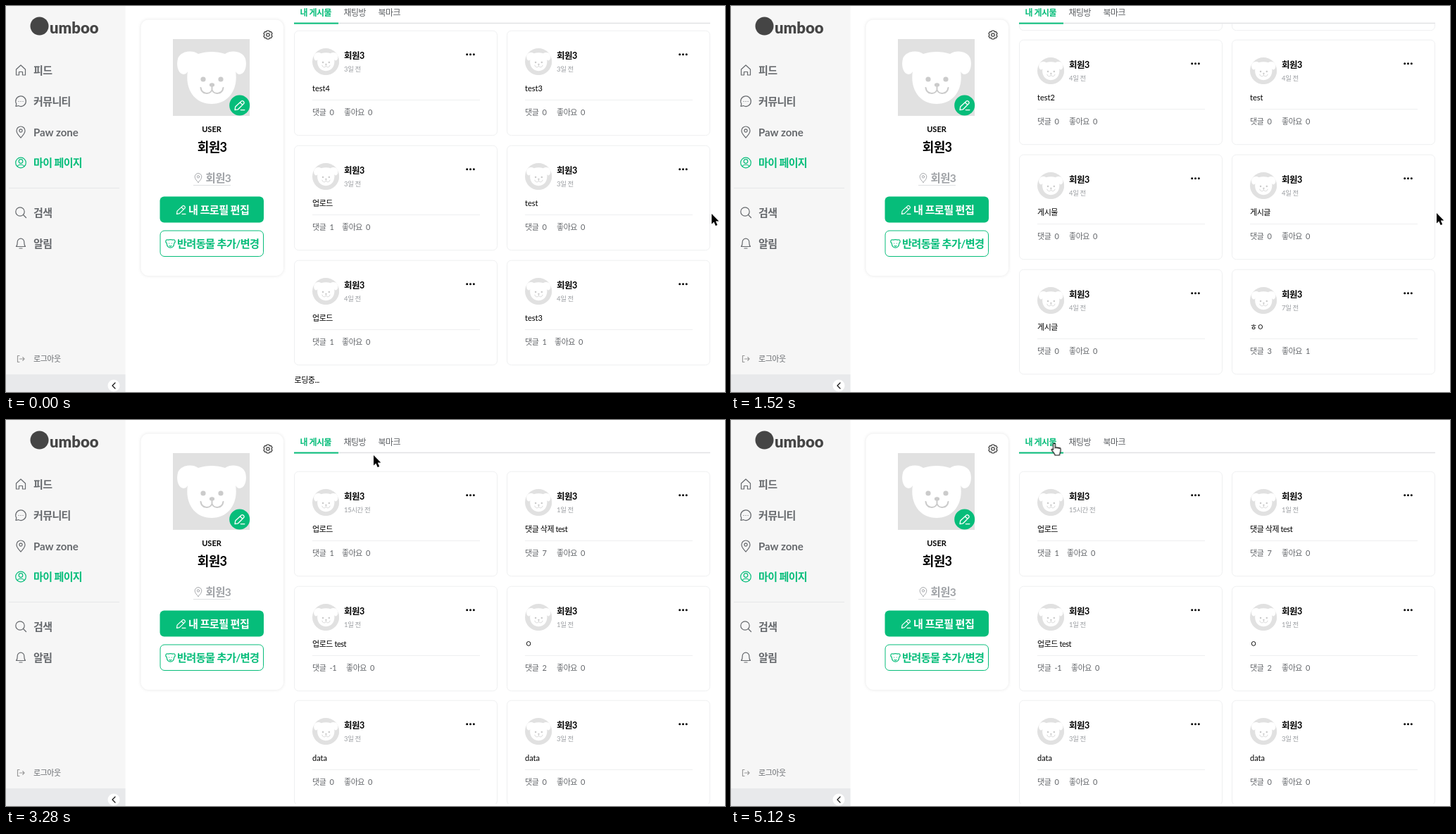
Write an HTML page that moves like this. It is 1021 px wide and 548 px high and loops after 5440 ms.

```html
<!DOCTYPE html>
<html lang="ko">
<head>
<meta charset="utf-8">
<title>마이 페이지</title>
<style>
html, body { margin: 0; width: 100%; height: 100%; overflow: hidden; background: #fff; }
svg { display: block; }
text {
  font-family: Lato, "Noto Sans CJK KR", "Noto Sans CJK", sans-serif;
  letter-spacing: -.04em; white-space: pre;
}
.b { font-weight: 700; }
.mid { text-anchor: middle; }
.latin { letter-spacing: 0; }
.menu text { font-size: 15px; font-weight: 700; }
.icon { fill: none; stroke: currentColor; stroke-width: 1.2; stroke-linecap: round; stroke-linejoin: round; }
.tabs text { font-size: 12px; fill: #5c5f63; }
.tabs .on { font-weight: 700; fill: #06bd7a; }
.card { fill: #fff; stroke: #eeeff0; }
.rule { fill: #eeeff0; }
.soft { fill: #fff; filter: drop-shadow(0 0 2px rgba(0, 0, 0, .11)); }
.bone { fill: #e9eaec; }

.scroll, .tabs, .late, .loading, .posts, .chat, .pointer, .arrow, .hand {
  animation: 5440ms step-end infinite;
}
.scroll { animation-name: scroll; }
.tabs { animation-name: stick; }
.late { animation-name: late; }
.loading { animation-name: loading; }
.posts { animation-name: posts; }
.chat { animation-name: chat; }
.pointer { animation-name: pointer; }
.arrow { animation-name: arrow; }
.hand { animation-name: hand; }

@keyframes scroll {
  0% { transform: translateY(-526px); }
  16.176% { transform: translateY(-526px); animation-timing-function: steps(3); }
  18.382% { transform: translateY(-733px); animation-timing-function: steps(2); }
  19.852% { transform: translateY(-840px); }
  22.794% { transform: translateY(-840px); animation-timing-function: steps(3); }
  25% { transform: translateY(-930px); animation-timing-function: steps(4); }
  27.941% { transform: translateY(-1001px); }
  36.764% { transform: translateY(-1001px); animation-timing-function: steps(3); }
  38.97% { transform: translateY(-790px); animation-timing-function: steps(4); }
  41.911% { transform: translateY(-412px); animation-timing-function: steps(3); }
  44.117% { transform: translateY(-150px); animation-timing-function: steps(3); }
  46.323%, 100% { transform: translateY(0); }
}
@keyframes stick {
  0% { transform: translateY(-22px); }
  46.323%, 100% { transform: translateY(0); }
}
@keyframes late { 0% { opacity: 0; } 10.294%, 100% { opacity: 1; } }
@keyframes loading { 0% { opacity: 1; } 10.294%, 100% { opacity: 0; } }
@keyframes posts { 0% { opacity: 1; } 65.441% { opacity: 0; } 92.647%, 100% { opacity: 1; } }
@keyframes chat { 0% { opacity: 0; } 65.441% { opacity: 1; } 92.647%, 100% { opacity: 0; } }
@keyframes pointer {
  0% { transform: translate(1002px, 295px); }
  27.941% { transform: translate(1002px, 294px); }
  48.529% { transform: translate(1002px, 294px); animation-timing-function: steps(8); }
  54.411% { transform: translate(650px, 118px); animation-timing-function: steps(6); }
  58.823% { transform: translate(522px, 50px); }
  60.294% { transform: translate(522px, 50px); animation-timing-function: steps(4); }
  63.235% { transform: translate(495px, 34px); }
  81.617% { transform: translate(495px, 34px); animation-timing-function: steps(14); }
  91.911%, 100% { transform: translate(459px, 33px); }
}
@keyframes arrow { 0% { opacity: 1; } 61.029%, 100% { opacity: 0; } }
@keyframes hand { 0% { opacity: 0; } 61.029%, 100% { opacity: 1; } }
</style>
</head>
<body>
<svg width="1021" height="548" viewBox="0 0 1021 548">
  <defs>
    <clipPath id="view"><rect x="400" width="621" height="544.5"/></clipPath>
    <clipPath id="round"><circle cx="54.5" cy="54.5" r="54.5"/></clipPath>
    <g id="dog">
      <rect width="109" height="109" fill="#e1e1e1"/>
      <path fill="#fff" d="M36 21C26 14 10 18 7 28C4 40 9 50 15 50C18 50 20 48 21 46C17 70 30 92 55 92C80 92 93 70 89 46C90 48 92 50 95 50C101 50 106 40 103 28C100 18 84 14 74 21C62 17 48 17 36 21Z"/>
      <g fill="#cbcbcb">
        <circle cx="43" cy="57" r="3.6"/>
        <circle cx="68" cy="57" r="3.6"/>
        <ellipse cx="55.5" cy="65" rx="3.6" ry="2.7"/>
        <path d="M55.5 67V72C53 79 41 79 39.5 69M55.5 72C58 79 70 79 71.5 69" fill="none" stroke="#cbcbcb" stroke-width="2" stroke-linecap="round"/>
      </g>
    </g>
    <g id="pencil" class="icon">
      <path d="M-6 6L-5.4 1.8L2.4 -5.4Q3.6 -6.3 4.8 -5.2L5.6 -4.3Q6.4 -3.2 5.4 -2.2L-2.2 5.4ZM.6 -3.6L3.8 -.6M1.5 6H6.5"/>
    </g>
    <g id="pin" class="icon">
      <path d="M0 8C-3 4.6 -6 2 -6 -2A6 6 0 0 1 6 -2C6 2 3 4.6 0 8Z"/>
      <circle cy="-2" r="2.1"/>
    </g>
  </defs>

  <!-- sidebar -->
  <rect width="169.5" height="548" fill="#f6f6f6"/>
  <rect y="523" width="169.5" height="25" fill="#e8e9eb"/>
  <circle cx="153" cy="539" r="8.5" fill="#fff"/>
  <path d="M155 535L151 539L155 543" class="icon" color="#111"/>
  <circle cx="47.5" cy="28.5" r="13" fill="#454545"/>
  <text x="62" y="39" class="latin" font-size="22" font-weight="900" fill="#454545">umboo</text>
  <rect x="4" y="258" width="157" height="1" fill="#e6e7e9"/>
  <g class="menu" fill="#66696d" color="#66696d">
    <path class="icon" d="M14.5 90L21 84L27.5 90V98H23.5V93.5H18.5V98H14.5Z"/>
    <text x="39" y="97">피드</text>
    <path class="icon" d="M14 142.5L14.8 139A7.3 7.3 0 1 1 17.5 141.6ZM18 135.5h.1M21 135.5h.1M24 135.5h.1"/>
    <text x="39" y="141">커뮤니티</text>
    <use href="#pin" x="21" y="179"/>
    <text x="39" y="184.5" class="latin">Paw zone</text>
    <g fill="#06bd7a" color="#06bd7a">
      <g class="icon"><circle cx="21" cy="222.5" r="7.3"/><circle cx="21" cy="220.5" r="2.8"/><path d="M16.2 228C17.5 224.3 24.5 224.3 25.8 228"/></g>
      <text x="39" y="228">마이 페이지</text>
    </g>
    <g class="icon"><circle cx="20" cy="292" r="6.2"/><path d="M24.5 296.5L28.5 300.5"/></g>
    <text x="39" y="299">검색</text>
    <path class="icon" d="M14.5 341.5C16.5 339.5 16 337 16.2 335A4.8 4.8 0 0 1 25.8 335C26 337 25.5 339.5 27.5 341.5ZM19 344H23"/>
    <text x="39" y="342.5">알림</text>
  </g>
  <path class="icon" color="#999" d="M19 496.5H16.5V505.5H19M19.5 501H26M23.8 498.7L26 501L23.8 503.3"/>
  <text x="39" y="505" font-size="11" fill="#66696d">로그아웃</text>

  <!-- profile -->
  <rect class="soft" x="191.5" y="19.5" width="202.5" height="363.5" rx="11"/>
  <g class="icon" color="#333" transform="translate(372 41)">
    <path d="M-1.5 -6H1.5L2.3 -4.3L4.5 -4.5L6 -1.9L5 0L6 1.9L4.5 4.5L2.3 4.3L1.5 6H-1.5L-2.3 4.3L-4.5 4.5L-6 1.9L-5 0L-6 -1.9L-4.5 -4.5L-2.3 -4.3Z"/>
    <circle r="2.2"/>
  </g>
  <use href="#dog" x="237" y="47"/>
  <circle cx="331.7" cy="141" r="14.5" fill="#06bd7a"/>
  <use href="#pencil" transform="translate(331.7 141) scale(1.1)" color="#fff"/>
  <text x="292" y="179" class="b mid latin" font-size="11">USER</text>
  <text x="292.5" y="206.5" class="b mid" font-size="18">회원3</text>
  <use href="#pin" transform="translate(273 244) scale(.8)" color="#a0a3a7"/>
  <text x="283.5" y="249.5" class="b" font-size="15.5" fill="#a0a3a7">회원3</text>
  <rect x="266" y="254" width="53" height="1" fill="#dddfe1"/>
  <rect x="218.5" y="270.6" width="147.5" height="37" rx="6" fill="#06bd7a"/>
  <use href="#pencil" x="248.5" y="289.3" color="#fff"/>
  <text x="259" y="295" class="b" font-size="15.2" fill="#fff">내 프로필 편집</text>
  <rect x="219" y="319" width="146.5" height="36.5" rx="6" fill="#fff" stroke="#06bd7a"/>
  <path class="icon" color="#06bd7a" transform="translate(233.5 337.3)"
    d="M-3.5 -5.2C-7 -7 -7.5 -1.5 -5.2 -.5C-5.5 8 5.5 8 5.2 -.5C7.5 -1.5 7 -7 3.5 -5.2Q0 -6.3 -3.5 -5.2ZM-2 -.3h.1M2 -.3h.1M-1.5 3.2Q0 4.4 1.5 3.2"/>
  <text x="243" y="343" class="b" font-size="15.2" fill="#06bd7a">반려동물 추가/변경</text>

  <!-- content -->
  <g clip-path="url(#view)">
    <g class="posts">
      <g class="scroll" id="cards"></g>
      <text class="loading" x="409.5" y="535" font-size="11">로딩중...</text>
    </g>
    <g class="chat" id="bones"></g>
    <g class="tabs">
      <rect x="400" width="612" height="47.5" fill="#fff"/>
      <rect x="409" y="45.7" width="591" height="1.5" fill="#e1e2e4"/>
      <g class="posts">
        <text class="on" x="417.5" y="35.5">내 게시물</text>
        <text x="479.5" y="35.5">채팅방</text>
        <rect x="409" y="45.6" width="63" height="2" fill="#06bd7a"/>
      </g>
      <g class="chat">
        <text x="417.5" y="35.5">내 게시물</text>
        <text class="on" x="479.5" y="35.5">채팅방</text>
        <rect x="472" y="45.6" width="48.5" height="2" fill="#06bd7a"/>
      </g>
      <text x="528.5" y="35.5">북마크</text>
    </g>
    <g class="posts"><g class="scroll" id="dots"></g></g>
  </g>

  <g class="pointer">
    <path class="arrow" d="M0 0V14.5L3.3 11.5L5.7 17L8.2 15.9L5.8 10.6H10.3Z" stroke="#fff" stroke-width="1.2" paint-order="stroke"/>
    <path class="hand" transform="translate(-4.5 -1)" fill="#fff" stroke="#111" stroke-width="1.2" stroke-linejoin="round"
      d="M3 2.5C3 .6 6 .6 6 2.5V8C6 6.2 8.6 6.4 8.6 8C8.6 6.6 11.1 6.7 11.1 8.4C11.1 7.2 13.5 7.3 13.5 9V12C13.5 14 12 15.5 12 18H5.5C5.5 15.5 2 13 .8 10.6C.3 9.2 1.8 8.6 3 10.2Z"/>
  </g>
</svg>

<script>
// body | age | comments | likes, two posts to a row
const posts = [
  '업로드|15시간|1|0', '댓글 삭제 test|1일|7|0',
  '업로드 test|1일|-1|0', 'ㅇ|1일|2|0',
  'data|3일|0|0', 'data|3일|0|0',
  'test4|3일|0|0', 'test3|3일|0|0',
  '업로드|3일|1|0', 'test|3일|0|0',
  '업로드|4일|1|0', 'test3|4일|1|0',
  'test2|4일|0|0', 'test|4일|0|0',
  '게시물|4일|0|0', '게시글|4일|0|0',
  '게시글|4일|0|0', 'ㅎㅇ|7일|3|1'
];
const COLUMN = 302, ROW = 162.7, FIRST_LATE = 12;
const likeX = { '1': 42, '-1': 48 };

const text = (x, y, size, fill, str, cls = '') =>
  `<text x="${x}" y="${y}" font-size="${size}" fill="${fill}" class="${cls}">${str}</text>`;
const place = (i, inner) => {
  const x = 409 + (i % 2) * COLUMN, y = 73 + Math.round(Math.floor(i / 2) * ROW);
  return `<g class="${i >= FIRST_LATE ? 'late' : ''}"><g transform="translate(${x} ${y})">${inner}</g></g>`;
};

function card(post) {
  const [body, age, comments, likes] = post.split('|');
  const lx = 26 + (likeX[comments] || 45);
  return `<rect class="card" x=".5" y=".2" width="288" height="148.5" rx="6"/>
    <g transform="translate(26 25) scale(.35)" clip-path="url(#round)"><use href="#dog"/></g>
    ${text(71, 40, 12.5, '#000', '회원3', 'b')}
    ${text(71, 57.5, 9.5, '#9b9ea2', age + ' 전')}
    ${text(26, 86.3, 11, '#000', body, /^\w+$/.test(body) ? 'latin' : '')}
    <rect class="rule" x="26" y="98" width="238" height="1"/>
    ${text(26, 119.5, 11, '#63666a', '댓글')}${text(50.5, 119.5, 11, '#63666a', comments)}
    ${text(lx, 119.5, 11, '#63666a', '좋아요')}${text(lx + 34, 119.5, 11, '#63666a', likes)}`;
}

const dots = [245.7, 250.5, 255.3].map(x => `<circle cx="${x}" cy="33.8" r="1.5"/>`).join('');

const bar = (x, y, w, h, r = 5) =>
  `<rect class="bone" x="${x}" y="${y}" width="${w}" height="${h}" rx="${r}"/>`;
const disc = x => `<circle class="bone" cx="${x}" cy="296" r="13.5"/>`;
const bones = `<rect class="soft" x="1" y="0" width="288" height="323" rx="8"/>
  ${bar(14, 14.5, 262, 218, 6)}${bar(14, 243, 109.5, 16.5)}${bar(220, 243, 55.5, 16.5)}
  <rect class="rule" x="14" y="270" width="262" height="1.3"/>
  ${disc(28)}${bar(47, 285, 65.5, 21.5)}${disc(229)}${disc(262)}`;

const fill = (id, html) => { document.getElementById(id).innerHTML = html; };
fill('cards', posts.map((p, i) => place(i, card(p))).join(''));
fill('dots', posts.map((p, i) => place(i, dots)).join(''));
fill('bones', [0, 1, 2, 3].map(i =>
  `<g transform="translate(${409 + (i % 2) * COLUMN} ${61 + (i >> 1) * 335.5})">${bones}</g>`).join(''));
</script>
</body>
</html>
```
